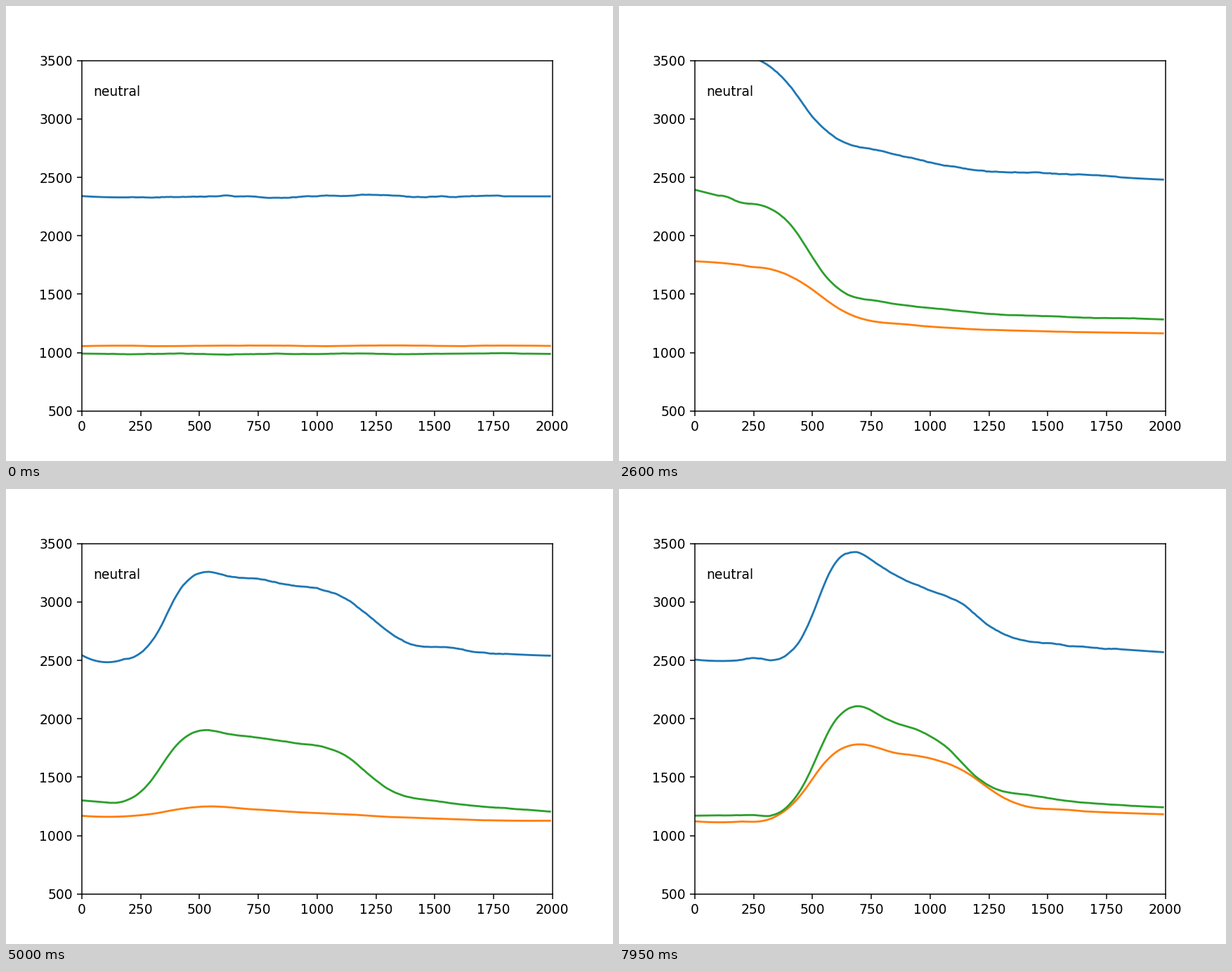
Animation, 864 px wide and 648 px high, one loop 8 s. Source, as a matplotlib script:

```python
import numpy as np
import matplotlib.pyplot as plt
from matplotlib.animation import FuncAnimation

FRAMES, INTERVAL = 160, 50
STEP, SHOWN = 10, 200            # ms per sample, samples in view
SHIFT = INTERVAL // STEP         # samples scrolled per frame
RELAX = 450                      # ms, decay after a pulse

t = np.arange((FRAMES - 1) * SHIFT + SHOWN) * STEP
x = np.arange(SHOWN) * STEP
rng = np.random.default_rng(4)


def ease(u):
    """Smooth step centred on zero, with a slight lead before it starts."""
    u = u + 0.5
    s = np.clip(u, 0, 1)
    return 0.03 * np.exp(3 * np.minimum(u, 0)) + 0.97 * s * s * (3 - 2 * s)


def level(rest, rise_len, fall_len, pulses):
    """Resting level that each pulse lifts, lets sag, drops and relaxes."""
    y = np.full(len(t), float(rest))
    for rise, peak, fall, shoulder, foot, rest in pulses:
        top = np.interp(t, [rise + rise_len / 2, fall - fall_len / 2],
                        [peak, shoulder])
        age = np.maximum(t - fall - fall_len / 2, 0)
        tail = rest + (foot - rest) * np.exp(-age / RELAX)
        y += (top - y) * ease((t - rise) / rise_len)
        y += (tail - y) * ease((t - fall) / fall_len)
    return y


class Smoother:
    """Sliding polynomial fit; the ends follow the outermost fits."""

    def __init__(self, window, order):
        self.w, self.h = window, window // 2
        base = np.vander(np.linspace(-1, 1, window), order + 1)
        self.fit = base @ np.linalg.pinv(base)

    def __call__(self, y):
        w, h = self.w, self.h
        return np.concatenate((self.fit[:h] @ y[:w],
                               np.convolve(y, self.fit[h], "valid"),
                               self.fit[h + 1:] @ y[-w:]))


def raw_signal(y, smooth, noise):
    """Sharpen the level so that smoothing gives it back, then add noise."""
    raw = y.copy()
    for _ in range(2):
        raw += y - smooth(raw)
    return raw + rng.normal(0, noise, len(y))


# Pulse: rise time, peak, fall time, shoulder, foot, next resting level
blue = level(2335, 285, 430, [
    (2518, 3690, 3055, 3530, 2785, 2490),
    (5357, 3260, 6228, 3115, 2635, 2495),
    (8470, 3455, 9140, 3130, 2670, 2540)])
orange = level(1058, 370, 460, [
    (2490, 1790, 3130, 1730, 1270, 1158),
    (5355, 1250, 6210, 1192, 1150, 1112),
    (8440, 1788, 9170, 1672, 1238, 1160)])
green = level(990, 320, 360, [
    (2512, 2340, 3085, 2265, 1490, 1275),
    (5340, 1905, 6205, 1770, 1335, 1165),
    (8465, 2120, 9080, 1900, 1385, 1200)])

fig = plt.figure(figsize=(6.4, 4.8), dpi=135)
ax = fig.add_subplot()
ax.set_xlim(0, 2000)
ax.set_ylim(500, 3500)
ax.text(50, 3200, "neutral")

traces = []
for y, color, smooth, noise in (
        (blue, "tab:blue", Smoother(37, 2), 30),
        (orange, "tab:orange", Smoother(41, 2), 6),
        (green, "tab:green", Smoother(21, 1), 11)):
    raw = raw_signal(y, smooth, noise)
    line, = ax.plot(x, smooth(raw[:SHOWN]), color=color)
    traces.append((line, smooth, raw))


def draw(frame):
    start = frame * SHIFT
    for line, smooth, raw in traces:
        line.set_ydata(smooth(raw[start:start + SHOWN]))
    return [line for line, _, _ in traces]


anim = FuncAnimation(fig, draw, frames=FRAMES, interval=INTERVAL,
                     repeat=True, repeat_delay=0)
plt.show()
```
